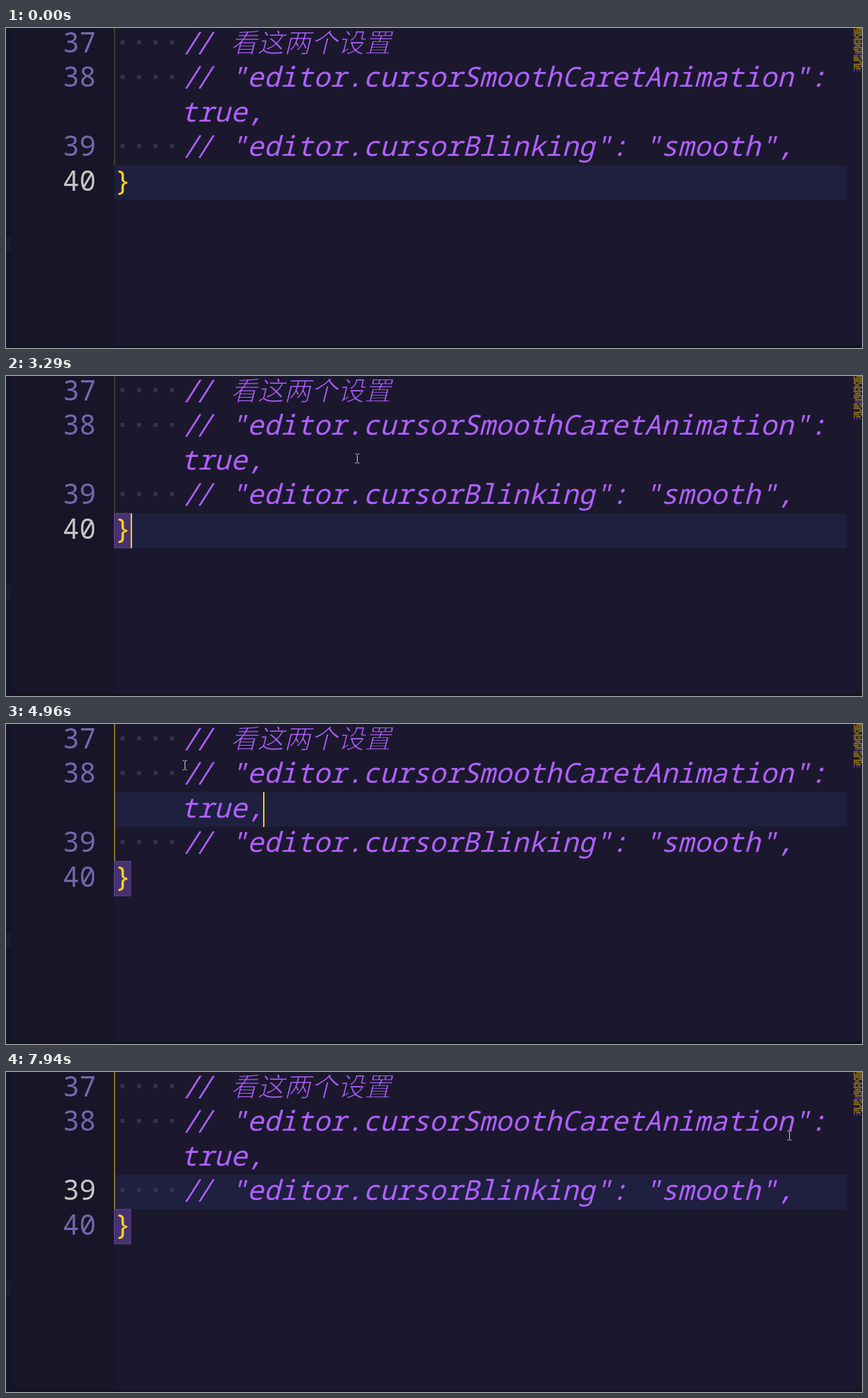
Animation, 1222 px wide and 458 px high, one loop 8000 ms. Source, as an HTML page:

```html
<!DOCTYPE html>
<html lang="zh">
<head>
<meta charset="utf-8">
<style>
  html, body { margin: 0; width: 100%; height: 100%; overflow: hidden; background: #1b182e; }
  svg { display: block; width: 100vw; height: 100vh; }
  text { font: 39.4px "Noto Sans Mono", "DejaVu Sans Mono", monospace; white-space: pre; }
  .note { fill: #b060ff; font-style: italic; }
  .slash { font-size: 46px; stroke: #1b182e; stroke-width: 0.7; }
  .han { font: italic 300 38.2px "Noto Sans CJK SC", "Noto Sans CJK", sans-serif; stroke: #1b182e; stroke-width: 1.1; }
  .num { fill: #7268ad; }
  .num.on { fill: #c8c5c5; }
  .brace { fill: #ffd024; }
</style>
</head>
<body>
<svg viewBox="0 0 1222 458" preserveAspectRatio="none">
  <rect width="1222" height="458" fill="#1b182e"/>
  <rect width="154" height="458" fill="#181528"/>
  <rect width="8" height="458" fill="#161327"/>
  <rect y="299" width="8" height="21" fill="#1c1931"/>
  <rect y="454" width="1222" height="4" fill="#151224"/>
  <rect id="row" x="155" width="1045" height="49.5" fill="#1f1f3f"/>
  <rect id="box" x="154.5" y="196.5" width="23.5" height="49.5" fill="#473270" stroke="#5d4290"/>
  <rect id="guide" x="154.3" width="1.4" height="196"/>
  <g id="map"></g>
  <g id="page"></g>
  <rect id="caret" width="2" height="50" fill="#fad000"/>
  <path id="mouse" d="M-3 -6.5H-1L0 -5.5L1 -6.5H3M0 -5.5V5.5M-3 6.5H-1L0 5.5L1 6.5H3"
        fill="none" stroke="#cfccd0"/>
  <circle id="press" r="12" fill="#e5e112" opacity="0.55"/>
</svg>
<script>
const LOOP = 8000, BLINK = 524, PRESS = 130, LEFT = 155;
const $ = id => document.getElementById(id);
const rowTop = i => -1.5 + i * 49.5;
const col = n => LEFT + n * 23.64;

function add(parent, tag, attrs, content = '') {
  const el = document.createElementNS('http://www.w3.org/2000/svg', tag);
  for (const k in attrs) el.setAttribute(k, attrs[k]);
  el.textContent = content;
  parent.append(el);
  return el;
}

// Editor rows: line number and text after the comment mark
const rows = [
  ['37', '看这两个设置'],
  ['38', '"editor.cursorSmoothCaretAnimation":'],
  ['', 'true,'],
  ['39', '"editor.cursorBlinking": "smooth",'],
  ['40', '}']
];
const nums = rows.map(([num, body], i) => {
  const page = $('page'), y = rowTop(i) + 36;
  const brace = body === '}', comment = num && !brace;
  if (comment) {
    for (let k = 0; k < 4; k++)
      add(page, 'circle', { cx: col(k + 0.48), cy: y - 14, r: 3.2, fill: '#353349' });
    for (const n of [4, 4.8])
      add(page, 'text', { x: col(n), y: y + 3, class: 'note slash' }, '/');
  }
  const kind = brace ? 'brace' : i ? 'note' : 'note han';
  add(page, 'text', { x: col(brace ? 0 : comment ? 7 : 4), y, class: kind }, body);
  return add(page, 'text', { x: 81, y, class: 'num' }, num);
});

// Minimap sliver
let seed = 7;
const rand = () => (seed = seed * 16807 % 2147483647) / 2147483647;
for (let y = 0; y < 63; y += 3) {
  const fill = y > 59 || (y > 34 && y < 39) ? '#4f3185' : '#80661f';
  for (let x = 1210; x < 1222; x += 2)
    if (rand() < 0.85) add($('map'), 'rect', { x, y, width: 2, height: 2.4, fill });
}

// Each move bends towards one or two control points, then the button is pressed
const glide = u => u * u * (3 - 2 * u), slowDown = u => 1 - (1 - u) ** 3, speedUp = u => u ** 3;
const entry = [1010, 438];
const moves = [
  { from: 190, to: 890, end: [229, 222], ease: slowDown, press: 1160, row: 4, col: 1 },
  { from: 2100, to: 3770, end: [512, 116], via: [[371, 145]], ease: slowDown, press: 3840, row: 2, col: 9 },
  { from: 3990, to: 4890, end: [256, 59], via: [[89, 43]], ease: glide, press: 5090, row: 1, col: 4 },
  { from: 5230, to: 6140, end: [1136, 177], ease: glide, press: 6340, row: 3, col: 41 },
  { from: 6780, to: 7940, end: [1119, 91], via: [[1150, 760], [60, 70]], ease: speedUp }
];
moves.forEach((m, i) => m.start = i ? moves[i - 1].end : entry);

function along({ from, to, start, end, via, ease }, t) {
  const s = ease(Math.min(1, Math.max(0, (t - from) / (to - from)))), r = 1 - s;
  return [0, 1].map(k => {
    if (!via) return start[k] * r + end[k] * s;
    const a = via[0][k], b = via[via.length - 1][k];
    return r ** 3 * start[k] + 3 * r * r * s * a + 3 * r * s * s * b + s ** 3 * end[k];
  });
}

const show = (id, on) => $(id).setAttribute('visibility', on ? 'visible' : 'hidden');

function render(t) {
  const click = moves.filter(m => m.press <= t).pop();
  const row = click ? click.row : 4;
  $('row').setAttribute('y', rowTop(row));
  nums.forEach((n, i) => n.classList.toggle('on', i === row));
  $('guide').setAttribute('fill', row === 4 ? '#57501f' : '#b0981c');
  show('box', t >= moves[0].press + 200);

  show('caret', click && Math.floor((t - click.press) / BLINK) % 2 === 0);
  show('press', click && t < click.press + PRESS);
  if (click) {
    $('caret').setAttribute('x', Math.floor(col(click.col)));
    $('caret').setAttribute('y', rowTop(row));
    $('press').setAttribute('cx', click.end[0] - 1);
    $('press').setAttribute('cy', click.end[1] - 0.5);
  }

  const move = moves.filter(m => m.from <= t).pop() || moves[0];
  const [x, y] = along(move, t).map(Math.round);
  $('mouse').setAttribute('transform', `translate(${x - 0.5} ${y})`);
  show('mouse', t >= moves[0].from);
}

const begin = performance.now();
function tick() {
  render((performance.now() - begin) % LOOP);
  requestAnimationFrame(tick);
}
render(0);
requestAnimationFrame(tick);
</script>
</body>
</html>
```
